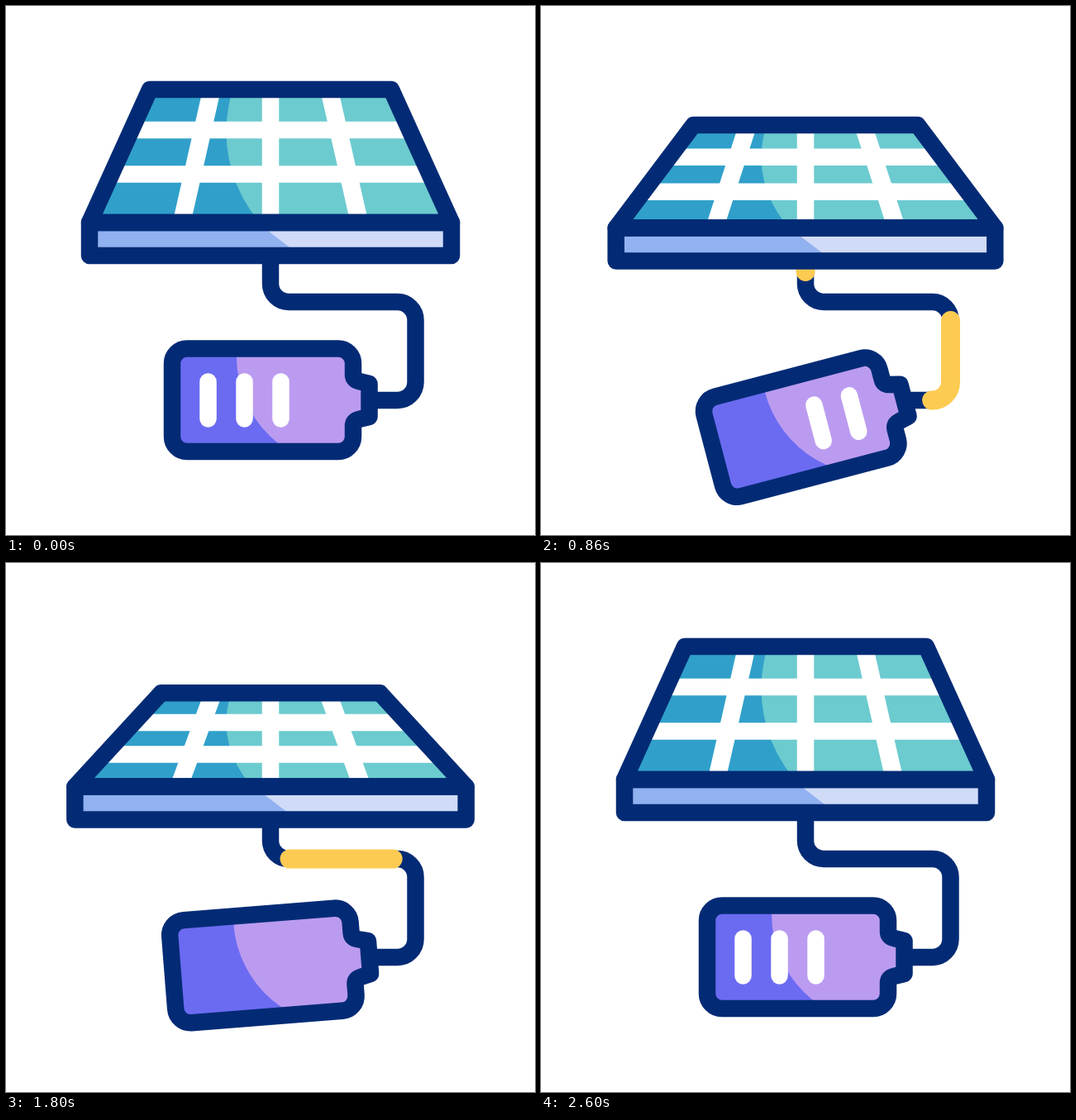
Recreate the animation shown at these times as an HTML page with a canvas. Size 640x640 px, loop 3 s.

```html
<!DOCTYPE html>
<html>
<head>
<meta charset="utf-8">
<title>Solar charging</title>
<style>
  html, body { margin: 0; height: 100%; overflow: hidden; background: #fff; }
  canvas { display: block; }
</style>
</head>
<body>
<canvas width="640" height="640"></canvas>
<script>
const ctx = document.querySelector('canvas').getContext('2d');
const LOOP = 3000, LINE = 20.5;
const NAVY = '#032b75', YELLOW = '#fecb52', WHITE = '#fff';

const clamp = u => Math.min(1, Math.max(0, u));
const ramp = (t, a, b) => clamp((t - a) / (b - a));
const ease = u => u * u * (3 - 2 * u);

// Smooth curve through [time, value] points, flat at both ends.
function curve(points) {
  const last = points.length - 1;
  const slope = i => i === 0 || i === last ? 0 :
    (points[i + 1][1] - points[i - 1][1]) / (points[i + 1][0] - points[i - 1][0]);
  return t => {
    if (t <= points[0][0]) return points[0][1];
    const i = points.findIndex(p => p[0] >= t);
    if (i < 0) return points[last][1];
    const [x0, y0] = points[i - 1], [x1, y1] = points[i];
    const w = x1 - x0, u = (t - x0) / w, k = ease(u);
    return y0 + (y1 - y0) * k +
      w * u * (1 - u) * ((1 - u) * slope(i - 1) - u * slope(i));
  };
}

const tilt = curve([[220, 0], [460, 9.5], [860, 43], [1260, 61], [1600, 65.5]]);
const spread = curve([[220, 0], [460, 2.3], [740, 7.3], [860, 10.3], [1260, 17.2], [1600, 20.5]]);
const travel = curve([[0, 0], [40, 19], [180, 69], [240, 98], [440, 234], [580, 316], [640, 344], [760, 378]]);
const swing = [[200, 0], [800, -15.6], [1400, 14.2], [2000, -11], [2600, 0]];

const cable = new Path2D('M320 302V336A22 22 0 0 0 342 358H473.5A22 22 0 0 1 495.5 380V455A22 22 0 0 1 473.5 477H440');
const battery = new Path2D('M219 414.5H402A18 18 0 0 1 420 432.5V446Q420 452.5 427 454L439.5 457V497L427 500Q420 501.5 420 508V521A18 18 0 0 1 402 539H219A18 18 0 0 1 201 521V432.5A18 18 0 0 1 219 414.5Z');

function polygon(...pts) {
  const path = new Path2D();
  pts.forEach(([x, y]) => path.lineTo(x, y));
  path.closePath();
  return path;
}

function stroke(path, color, width = LINE) {
  ctx.strokeStyle = color;
  ctx.lineWidth = width;
  ctx.stroke(path);
}

function line(x0, y0, x1, y1, color, width = LINE) {
  const path = new Path2D();
  path.moveTo(x0, y0);
  path.lineTo(x1, y1);
  stroke(path, color, width);
}

function fill(path, color) {
  ctx.fillStyle = color;
  ctx.fill(path);
}

// Fills a shape in two tones: the base and a lighter part clipped to it.
function twoTone(shape, base, light, lightShape) {
  fill(shape, base);
  ctx.clip(shape);
  fill(lightShape, light);
}

function ellipse(x, y, rx, ry) {
  const path = new Path2D();
  path.ellipse(x, y, rx, ry, 0, 0, 7);
  return path;
}

function drawRays(t) {
  const head = 46 * ramp(t, 990, 1390), tail = 46 * ramp(t, 1260, 1560);
  if (head <= tail) return;
  const d = Math.SQRT1_2;
  for (const [x, y, dx, dy] of [[320, 95, 0, -1], [242, 114, -d, -d], [398, 114, d, -d]])
    line(x + dx * tail, y + dy * tail, x + dx * head, y + dy * head, YELLOW);
}

function drawCable(t) {
  stroke(cable, NAVY);
  for (const start of [220, 820, 1420]) {
    const head = travel(t - start), tail = travel(t - start - 200);
    if (head <= tail) continue;
    ctx.setLineDash([head - tail, 999]);
    ctx.lineDashOffset = -tail;
    stroke(cable, YELLOW, 23);
    ctx.setLineDash([]);
  }
}

function drawPanel(t) {
  const back = 1 - ease(ramp(t, 1625, 2375));
  const d = tilt(t) * back, wide = 219 + spread(t) * back;
  const top = 101 + d, mid = 262 + d * .153, bottom = 302 + d * .153;
  const narrow = 146 - d * .242, left = 320 - wide, right = 320 + wide;
  const face = polygon([320 - narrow, top], [320 + narrow, top], [right, mid], [left, mid]);
  const edge = polygon([left, mid], [right, mid], [right, bottom], [left, bottom]);

  ctx.save();
  twoTone(face, '#30a0ca', '#6ccbcf', ellipse(435.5, 152 + d * .72, 169, 169 - d * .6));
  ctx.fillStyle = '#6ccbcf';
  ctx.fillRect(435, top, 200, mid - top);
  for (const y of [150 + d * .763, 203.5 + d * .496]) line(left, y, right, y, WHITE);
  line(320, top, 320, mid, WHITE);
  for (const side of [-1, 1])
    line(320 + side * (71 - d * .03), top, 320 + side * (107.5 + d * .06), mid, WHITE, 21.5);
  ctx.restore();

  ctx.save();
  twoTone(edge, '#92b1f0', '#d0dbf8', polygon([317 - d * .075, mid + 10],
    [right, mid + 10], [right, bottom - 10], [343 - d * .07, bottom - 10]));
  ctx.restore();

  stroke(face, NAVY);
  stroke(edge, NAVY);
}

function batteryAngle(t) {
  return swing.slice(1).reduce((angle, [time, value], i) =>
    angle + (value - swing[i][1]) * ease(ramp(t, swing[i][0], time)), 0);
}

function barVisible(i, t) {
  const off = 560 + 250 * i;
  return i < 3 ? t < off || t >= off + 1290 : t >= 340 && t < off;
}

function drawBattery(t) {
  ctx.save();
  ctx.translate(440, 477);
  ctx.rotate(batteryAngle(t) * Math.PI / 180);
  ctx.translate(-440, -477);
  ctx.save();
  twoTone(battery, '#6b6bf2', '#bb9bf0', ellipse(412, 425, 133, 133));
  ctx.restore();
  stroke(battery, NAVY);
  for (let i = 0; i < 4; i++) {
    const x = 244.5 + 44 * i;
    if (barVisible(i, t)) line(x, 454.5, x, 499.5, WHITE);
  }
  ctx.restore();
}

function draw(now) {
  const t = now % LOOP;
  ctx.fillStyle = WHITE;
  ctx.fillRect(0, 0, 640, 640);
  ctx.lineCap = ctx.lineJoin = 'round';
  drawRays(t);
  drawCable(t);
  drawPanel(t);
  drawBattery(t);
  requestAnimationFrame(draw);
}
requestAnimationFrame(draw);
</script>
</body>
</html>
```
